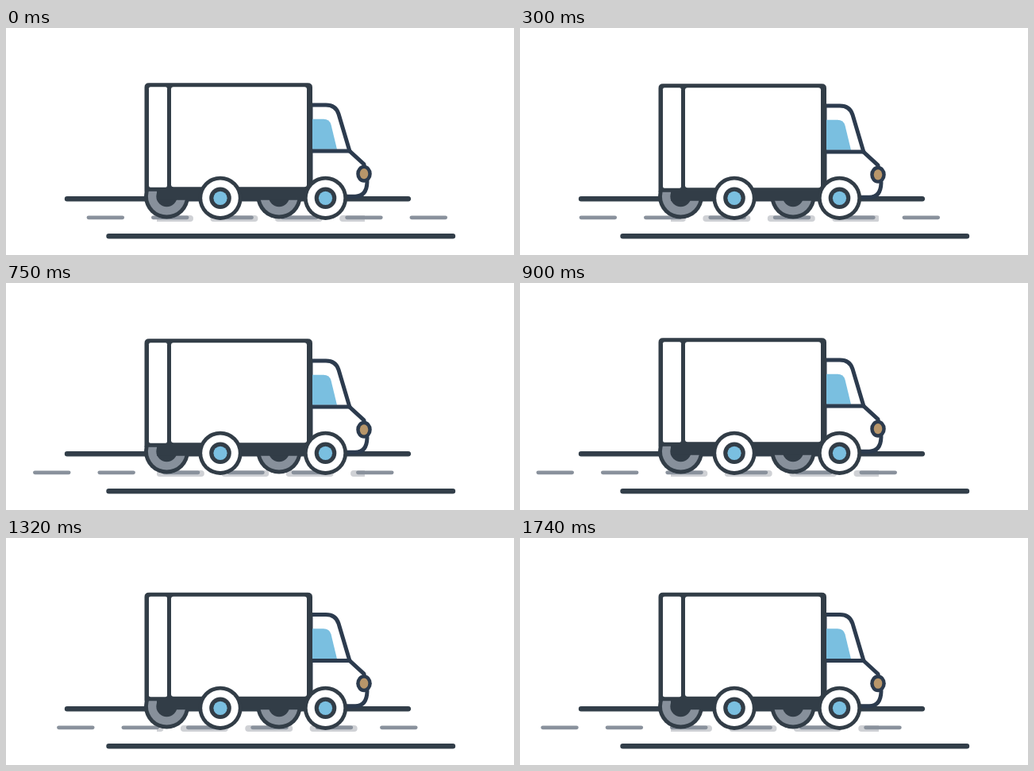
These frames come from a looping animation (640x286 px, 1770 ms). An HTML page:

```html
<!DOCTYPE html>
<html lang="en">
<head>
<meta charset="utf-8">
<title>Delivery truck</title>
<style>
  html, body { margin: 0; width: 100%; height: 100%; overflow: hidden; background: #fff; }
  svg { display: block; width: 100%; height: 100%; }
  .dark { fill: #323d47; }
  .white { fill: #fff; }
  .grey { fill: #87909b; }
  .blue { fill: #7abfe0; }
  .road { stroke: #323e49; stroke-width: 6.4; stroke-linecap: round; }
  .dash { stroke: #89919c; stroke-width: 4.8; stroke-linecap: round; }
  .shade { stroke: #cfd1d5; stroke-width: 8; stroke-linecap: round; }
  .cab { stroke: #2c3b4e; stroke-width: 5; stroke-linejoin: round; stroke-linecap: round; }
</style>
</head>
<body>
<svg viewBox="0 0 640 286">
  <defs>
    <clipPath id="under"><rect x="190" y="230" width="262" height="20"/></clipPath>
    <g id="farWheel">
      <circle class="dark" r="28.5"/>
      <circle class="grey" r="23.6"/>
      <circle class="dark" r="13.2"/>
    </g>
    <g id="nearWheel">
      <circle class="dark" r="27.6"/>
      <circle class="white" r="22.8"/>
      <circle class="dark" r="13.8"/>
      <circle class="blue" r="8.6"/>
    </g>
  </defs>

  <path class="road" d="M77 215.3H507M129.500 262.200H563"/>
  <g clip-path="url(#under)"><g id="shades"></g></g>
  <g id="dashes"></g>

  <use href="#farWheel" x="202.500" y="212"/>
  <use href="#farWheel" x="344" y="212"/>

  <g id="truck">
    <path class="cab" fill="#fff" d="M384 97.200H403Q415.500 97.200 419 108.500L433 155.500L451 172
      L455 194Q454.500 212.500 440 212.500H384Z"/>
    <path class="blue" d="M386 115H400Q407.500 115 409.500 122L417 153H386Z"/>
    <path class="cab" fill="none" d="M385 155.200H433"/>
    <ellipse cx="451" cy="184" rx="9.800" ry="11" fill="#2c3b4e"/>
    <ellipse cx="451" cy="184" rx="5.300" ry="6.600" fill="#b8966a"/>
    <path class="dark" d="M174.500 75Q174.500 69.500 180 69.500H380Q386 69.500 386 75V217H190V206H174.500Z"/>
    <rect class="white" x="180" y="74.500" width="23" height="126.500" rx="2"/>
    <rect class="white" x="208" y="74.500" width="171" height="126" rx="3"/>
  </g>

  <use href="#nearWheel" x="270" y="214.300"/>
  <use href="#nearWheel" x="402.500" y="214.300"/>
</svg>
<script>
  const LOOP = 1770, STEP = 30;
  const GAP = 81.4, SPEED = 0.0901, LEFT = 20.3;
  const BOB = 0.85, BOB_PERIOD = 225;

  const byId = id => document.getElementById(id);
  const truck = byId('truck'), dashes = byId('dashes'), shades = byId('shades');

  function addLine(parent, cls, x1, x2, y) {
    const line = document.createElementNS('http://www.w3.org/2000/svg', 'path');
    line.setAttribute('class', cls);
    line.setAttribute('d', `M${x1} ${y}H${x2}`);
    parent.append(line);
  }

  for (let i = 0; i < 6; i++) {
    const x = i * GAP;
    addLine(dashes, 'dash', x + 2.4, x + 45.1, 238.8);
    addLine(shades, 'shade', x - 3, x + 49, 240);
  }

  function draw(t) {
    const travel = GAP - 0.1 - SPEED * t;
    const x = LEFT + ((travel % GAP) + GAP) % GAP;
    const y = BOB * Math.cos(2 * Math.PI * (t - 70) / BOB_PERIOD);
    for (const g of [dashes, shades]) g.setAttribute('transform', `translate(${x.toFixed(2)} 0)`);
    truck.setAttribute('transform', `translate(0 ${y.toFixed(2)})`);
  }

  const start = performance.now();
  function tick() {
    const t = (performance.now() - start) % LOOP;
    draw(Math.floor(t / STEP) * STEP);
    requestAnimationFrame(tick);
  }
  tick();
</script>
</body>
</html>
```
